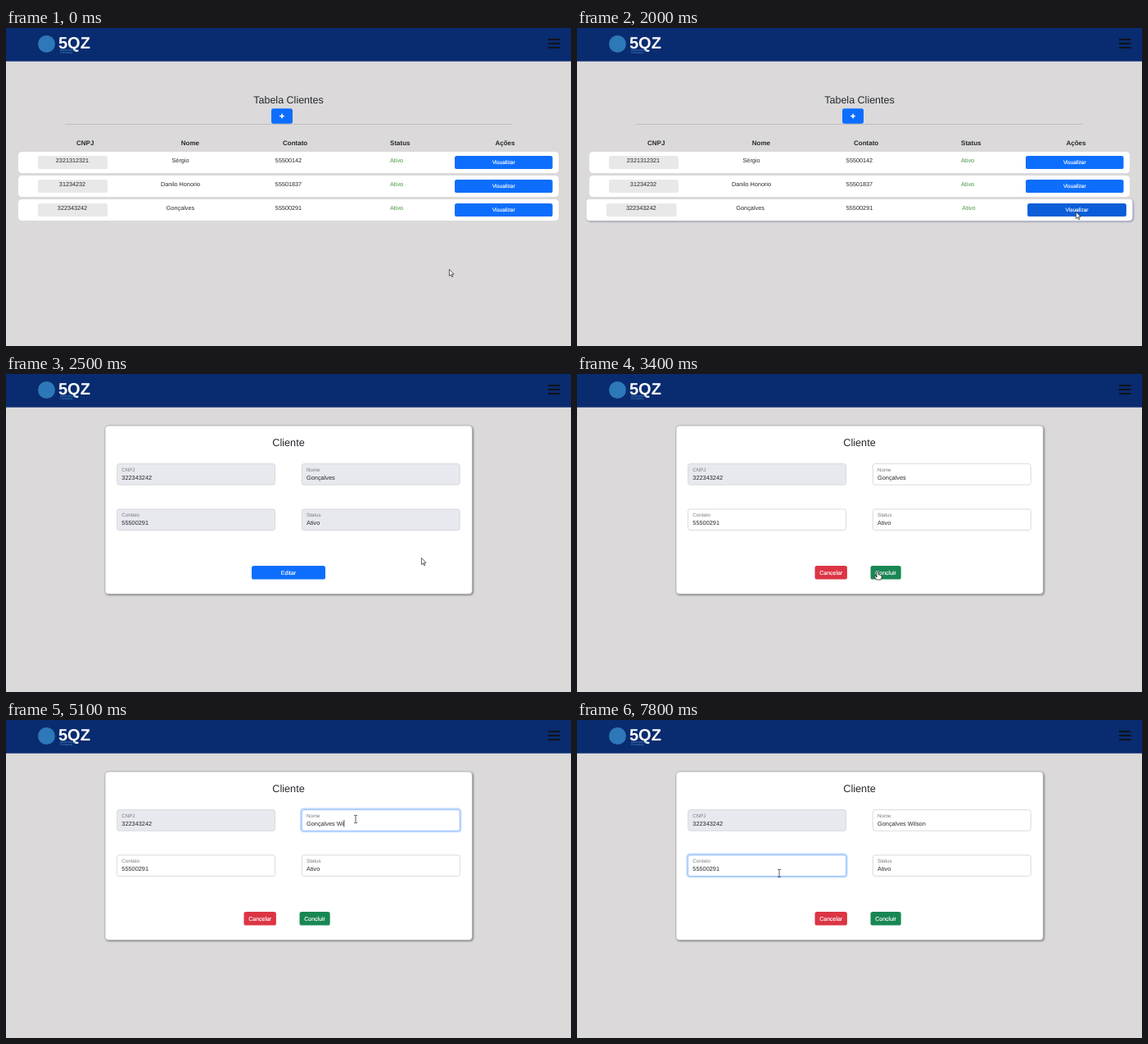
These frames come from a looping animation (690 by 388 pixels, 8000 ms). An HTML page:

```html
<!DOCTYPE html>
<html lang="pt">
<head>
<meta charset="utf-8">
<title>Tabela Clientes</title>
<style>
  html, body { margin: 0; width: 100%; height: 100%; overflow: hidden; background: #dbd9da; }
  svg { display: block; width: 690px; height: 388px; }
  text { font-family: "Liberation Sans", Arial, sans-serif; text-rendering: geometricPrecision; }
  .card { filter: drop-shadow(1.6px 1.6px 0.8px #777); }
  .row { filter: drop-shadow(0 0.4px 0.6px #a5a5a8); }
  .lifted { filter: drop-shadow(1px 1.4px 0.8px #8488a6); }
</style>
</head>
<body>
<svg id="stage" viewBox="0 0 690 388"></svg>
<script>
const LOOP = 8000, STEP = 100;
const stage = document.getElementById('stage');
const BLUE = [13, 110, 253], BLUE_HOVER = [11, 94, 215];
const GREEN = [25, 135, 84], GREEN_HOVER = [21, 115, 71];

const clients = [
  ['2321312321', 'Sérgio', '55500142'],
  ['31234232', 'Danilo Honorio', '55501837'],
  ['322343242', 'Gonçalves', '55500291'],
];

// time, x, y, pointer shape from that time on
const pointerPath = [
  [0, 541, 294, 'arrow'], [400, 541, 294, 'arrow'], [700, 611, 271, 'arrow'],
  [800, 611, 271, 'arrow'], [900, 609, 232, 'arrow'], [1300, 609, 224, 'arrow'],
  [2200, 609, 224, 'arrow'], [2400, 604, 224, 'arrow'], [2500, 507, 224, 'arrow'],
  [2900, 382, 239, 'hand'], [3200, 367, 241, 'hand'], [3400, 367, 241, 'hand'],
  [3600, 374, 231, 'arrow'], [3900, 424, 126, 'beam'], [4200, 427, 120, 'beam'],
  [4300, 427, 121, 'beam'], [6100, 427, 121, 'beam'], [6300, 460, 131, 'beam'],
  [6400, 460, 131, 'beam'], [6600, 420, 160, 'arrow'], [6900, 325, 204, 'arrow'],
  [7100, 270, 195, 'arrow'], [7200, 250, 188, 'beam'], [7300, 247, 187, 'beam'],
  [LOOP, 247, 187, 'beam'],
];

// time and what has been typed after the name by then
const typed = [[4900, ' W'], [5100, ' Wi'], [5400, ' Wil'], [5500, ' Wils'], [5600, ' Wilso'], [5700, ' Wilson']];

const ramp = (t, from, to) => Math.max(0, Math.min(1, (t - from) / (to - from)));
const smooth = p => p * p * (3 - 2 * p);
const mix = (a, b, p) => `rgb(${a.map((v, i) => Math.round(v + (b[i] - v) * p))})`;

const rect = (x, y, w, h, fill, more = '') =>
  `<rect x="${x}" y="${y}" width="${w}" height="${h}" fill="${fill}" ${more}/>`;
const text = (x, y, size, str, more = '') =>
  `<text x="${x}" y="${y}" font-size="${size}" fill="#26292d" ${more}>${str}</text>`;
const centred = (x, y, size, str, more = '') => text(x, y, size, str, `text-anchor="middle" ${more}`);
const button = (x, y, w, h, fill, label, size) =>
  rect(x, y, w, h, fill, 'rx="2.6"') +
  centred(x + w / 2, y + h / 2 + size * .36, size, label, 'style="fill:#fff" stroke="#fff" stroke-width=".15"');

function navbar() {
  return rect(0, 0, 690, 40.7, '#092b6f') +
    '<circle cx="49.5" cy="19.5" r="10.5" fill="#2d78b8"/>' +
    text(64, 24.6, 20, '5QZ', 'font-weight="bold" style="fill:#fff"') +
    text(66, 28, 3.6, 'International', 'style="fill:#4c8fce"') +
    text(66, 31.4, 3.6, 'Company', 'style="fill:#4c8fce"') +
    [13, 18, 23].map(y => rect(662, y, 14.6, 2, '#10131c')).join('');
}

function tablePage(t) {
  const lift = smooth(ramp(t, 800, 1200)), hover = ramp(t, 900, 1100);
  const heads = ['CNPJ', 'Nome', 'Contato', 'Status', 'Ações'];
  const rows = clients.map(([id, name, phone], i) => {
    const y = 151 + 29 * i, last = i === 2;
    const scale = last ? 1 + .0105 * lift : 1;
    return `<g transform="translate(345 ${y + 13}) scale(${scale}) translate(-345 ${-y - 13})">` +
      rect(15, y, 660, 26, '#fff', `rx="4" class="${last && lift ? 'lifted' : 'row'}"`) +
      rect(39, y + 5, 85, 16, '#e8e8e9', 'rx="2.6"') +
      centred(81, y + 13, 7.25, id) +
      centred(213, y + 13, 7.25, name) +
      centred(345, y + 13, 7.25, phone) +
      centred(477, y + 13, 7.25, 'Ativo', 'style="fill:#45963f"') +
      button(548, y + 5, 119.5, 16, mix(BLUE, BLUE_HOVER, last ? hover : 0), 'Visualizar', 6.4) + '</g>';
  });
  return navbar() +
    centred(345, 91.5, 12.5, 'Tabela Clientes') +
    rect(324, 98.3, 26, 18.4, mix(BLUE, BLUE, 0), 'rx="2.6"') +
    '<path d="M337 104.7v5.6M334.2 107.5h5.6" stroke="#fff" stroke-width="1.6"/>' +
    rect(72, 117.2, 546, .8, '#bab9bb') +
    heads.map((h, i) => centred(96.7 + 128.2 * i, 143, 8, h, 'font-weight="bold"')).join('') +
    rows.join('');
}

function loader(t) {
  const lead = Math.round((t - 2400) / STEP);
  let out = '';
  for (let i = 0; i < 12; i++) {
    const dark = (i - lead + 25) % 12 < 3;
    out += `<path d="M5.4 0H10" transform="translate(346 11.5) rotate(${30 * i})" stroke="#000"
      stroke-width="1.9" stroke-linecap="round" opacity="${dark ? 1 : .07}"/>`;
  }
  return out;
}

function field(x, y, label, value, { locked, focus = 0, caret } = {}) {
  const glow = focus ? rect(x - .8, y - .8, 195, 27.6, 'none',
    `rx="3.4" stroke="#0d6efd" stroke-opacity="${.25 * focus}" stroke-width="2.4"`) : '';
  return glow +
    rect(x + .3, y + .3, 192.9, 25.6, locked ? '#e8e9ee' : '#fff',
      `rx="2.6" stroke="${mix([206, 210, 217], [134, 183, 254], focus)}" stroke-width=".8"`) +
    text(x + 6, y + 9.6, 6.2, label, 'style="fill:#777b80"') +
    text(x + 6, y + 19.4, 7.35, value, caret ? 'id="active"' : '') +
    (caret ? rect(x + 6, y + 12.7, .8, 8.4, '#222', 'id="caret"') : '');
}

function formPage(t) {
  const editing = t >= 3400, locked = !editing;
  const [id, name, phone] = clients[2];
  const added = typed.filter(k => k[0] <= t).pop();
  const nameFocus = ramp(t, 4000, 4200) * (1 - ramp(t, 7300, 7500));
  const nameCaret = t >= 4100 && t < 7400 &&
    !(t >= 4600 && t < 4900) && !(t >= 5700 && Math.floor((t - 5700) / 500) % 2);
  const phoneCaret = t >= 7400 && t < 7800;
  const buttons = editing
    ? button(290.5, 234, 39.4, 16.6, '#dc3545', 'Cancelar', 7) +
      button(358.5, 234, 37.2, 16.6, mix(GREEN, GREEN_HOVER, t > 3400 && t < 3600 ? 1 : 0), 'Concluir', 7)
    : button(300, 234, 90, 16.6, mix(BLUE, BLUE_HOVER, ramp(t, 2800, 3000)), 'Editar', 7);
  return navbar() +
    rect(121, 63, 448.4, 205.6, '#fff', 'rx="4" stroke="#a9a9aa" stroke-width=".7" class="card"') +
    centred(345, 87.6, 12.7, 'Cliente') +
    field(135.3, 109.3, 'CNPJ', id, { locked: true }) +
    field(361, 109.3, 'Nome', name + (added ? added[1] : ''), { locked, focus: nameFocus, caret: nameCaret }) +
    field(135.3, 164.6, 'Contato', phone, { locked, focus: ramp(t, 7300, 7500), caret: phoneCaret }) +
    field(361, 164.6, 'Status', 'Ativo', { locked }) +
    buttons;
}

const shapes = {
  arrow: '<path d="M.4.4V8.6L2.3 6.9 3.6 9.8 4.8 9.3 3.5 6.4H6Z" fill="#fff" stroke="#222" stroke-width=".7"/>',
  hand: `<path d="M-1 .2Q0-.8 1 .2V4Q2 3.3 2.6 4.2 3.6 3.8 4 4.8 5.2 4.6 5.2 5.8V7.6L4 10H-1.2
    L-3.8 6.4Q-3.6 5.2-2.4 5.8L-1 7Z" fill="#fff" stroke="#111" stroke-width=".7"/>`,
  beam: '<path d="M-2-4.6H-.5L0-4.2.5-4.6H2M0-4.2V4.2M-2 4.6H-.5L0 4.2.5 4.6H2" fill="none" stroke="#333" stroke-width=".8"/>',
};

function pointer(t) {
  const i = pointerPath.findIndex(k => k[0] > t);
  const a = pointerPath[i - 1], b = pointerPath[i], p = ramp(t, a[0], b[0]);
  const x = a[1] + (b[1] - a[1]) * p, y = a[2] + (b[2] - a[2]) * p;
  return `<g transform="translate(${x} ${y})">${shapes[a[3]]}</g>`;
}

function render(t) {
  const page = t < 2200 ? tablePage : t < 2500 ? loader : formPage;
  stage.innerHTML = rect(0, 0, 690, 388, '#dbd9da') + page(t) + pointer(t);
  const active = document.getElementById('active');
  if (active) {
    const end = +active.getAttribute('x') + active.getComputedTextLength();
    document.getElementById('caret').setAttribute('x', end + .2);
  }
}

let shown = -1;
function tick() {
  const t = Math.floor(performance.now() % LOOP / STEP) * STEP;
  if (t !== shown) render(shown = t);
  requestAnimationFrame(tick);
}
tick();
</script>
</body>
</html>
```
